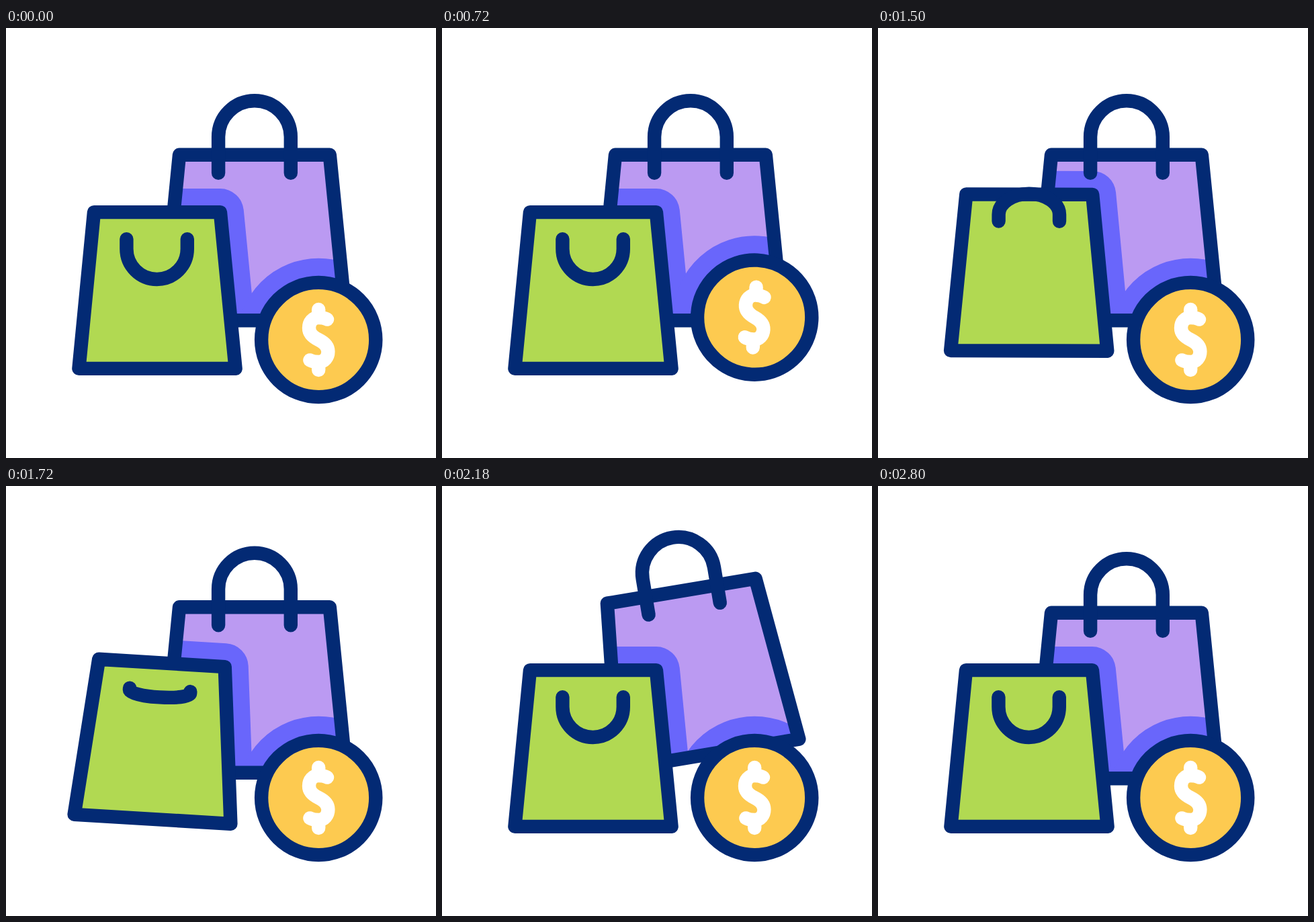
These frames come from a looping animation (640x640 px, 2.82 s). An HTML page:

```html
<!DOCTYPE html>
<html lang="en">
<head>
<meta charset="utf-8">
<title>Shopping bags</title>
<style>
  html, body { margin: 0; width: 100%; height: 100%; overflow: hidden; background: #fff; }
  svg { display: block; width: 100%; height: 100%; }
  .line { fill: none; stroke: #032a74; stroke-width: 20.4; stroke-linecap: round; stroke-linejoin: round; }
  .shade { fill: #6966fb; stroke: #6966fb; stroke-width: 70; stroke-linejoin: round; }
</style>
</head>
<body>
<svg viewBox="0 0 640 640">
  <defs>
    <path id="tall" d="M258 188.8H481.8L506.3 435.2H233.7Z"/>
    <path id="wide" d="M131 274.1H318.9L341.6 506.9H108.4Z"/>
    <clipPath id="inside"><use href="#tall" class="purple"/></clipPath>
  </defs>

  <use href="#tall" class="purple" fill="#bb9af2"/>
  <g clip-path="url(#inside)">
    <use href="#wide" class="green shade"/>
    <circle class="coin shade" cx="465.2" cy="464" r="86.3"/>
  </g>
  <g class="purple line">
    <use href="#tall"/>
    <path d="M316.1 215.7V162A53.8 53.8 0 0 1 423.8 162V215.7"/>
  </g>

  <g class="green">
    <use href="#wide" class="line" style="fill:#b1d952"/>
    <path id="handle" class="line"/>
  </g>

  <g class="coin">
    <circle class="line" cx="465.2" cy="464" r="85.1" style="fill:#fdca50"/>
    <path class="line" style="stroke:#fff" d="M465.2 419V431M465.2 497V509
      M478 433.6C474 431.4 469.5 431 465.2 431C456.5 431 451 438 451 446.5C451 455 457 460 465.2 464
      C473.4 468 479.4 473 479.4 481.5C479.4 490 473.9 497 465.2 497C460.9 497 456.4 496.6 452.4 494.4"/>
  </g>
</svg>
<script>
const LOOP = 2820;
const items = [
  { name: 'coin', start: 0, height: 51.7, pivot: [465.2, 464] },
  { name: 'green', start: 800, height: 38.8, pivot: [225, 390.5] },
  { name: 'purple', start: 1600, height: 38.8, pivot: [370, 271.8] }
];
for (const item of items) item.nodes = document.querySelectorAll('.' + item.name);
const handle = document.getElementById('handle');

// Eased interpolation through [time, value] keys
function track(keys, t) {
  if (t <= keys[0][0]) return keys[0][1];
  for (let i = 1; i < keys.length; i++) {
    const [t0, a] = keys[i - 1], [t1, b] = keys[i];
    if (t < t1) {
      const u = (t - t0) / (t1 - t0);
      return a + (b - a) * u * u * (3 - 2 * u);
    }
  }
  return keys[keys.length - 1][1];
}

const HOP = [[0, 0], [400, 1], [1200, 0]];
const WOBBLE = [[200, 0], [400, 10], [600, -10], [800, 10], [1000, 0]];
const FLIP = [[200, 1], [600, -0.82], [1200, 1]];

function handlePath(scale) {
  const top = 314.1, bend = top + 14.7 * scale;
  const ry = Math.max(0.01, Math.abs(45.2 * scale));
  const sweep = scale > 0 ? 0 : 1;
  return `M179.4 ${top}V${bend}A45.2 ${ry} 0 0 ${sweep} 269.8 ${bend}V${top}`;
}

function draw(time) {
  for (const { start, height, pivot, nodes } of items) {
    const t = time - start;
    const y = -height * track(HOP, t);
    const transform = `translate(0 ${y}) rotate(${track(WOBBLE, t)} ${pivot})`;
    nodes.forEach(node => node.setAttribute('transform', transform));
  }
  handle.setAttribute('d', handlePath(track(FLIP, time - 800)));
}

const origin = performance.now();
function tick() {
  draw((performance.now() - origin) % LOOP);
  requestAnimationFrame(tick);
}
tick();
</script>
</body>
</html>
```
